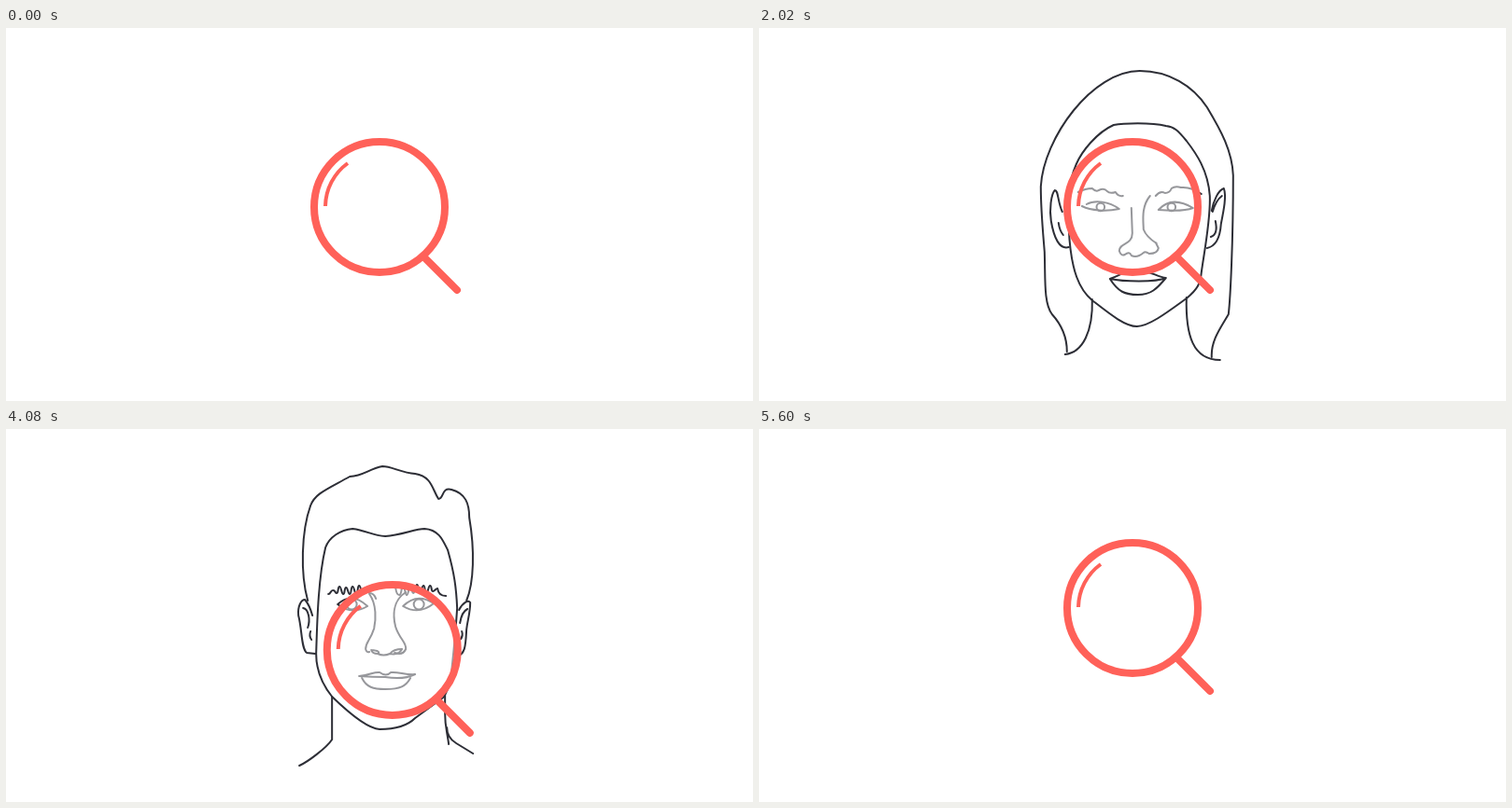
These frames come from a looping animation (800x400 px, 5.76 s). An HTML page:

```html
<!DOCTYPE html>
<html lang="en">
<head>
<meta charset="utf-8">
<title>Magnifier over faces</title>
<style>
html, body { margin: 0; width: 100%; height: 100%; overflow: hidden; background: #fff; }
svg { display: block; width: 800px; height: 400px; }
.face { fill: none; stroke: #2d2e36; stroke-width: 2; stroke-linecap: round; stroke-linejoin: round; }
.glass { fill: none; stroke: #ff6159; stroke-width: 8; }
</style>
</head>
<body>
<svg viewBox="0 0 800 400">
  <g id="woman" class="face">
    <!-- hair and neck -->
    <path d="M331 347C331 330 325 318 315 307C306 295 308 270 307 240C305 215 303 195 303 170C306 118 358 46 409 46C440 46 466 62 481 85C496 110 508 132 509 158C509 230 506 290 504 307C496 321 485 335 486 353"/>
    <path d="M358 291C359 325 348 348 329 350M459 289C458 330 466 356 495 356"/>
    <!-- face -->
    <path d="M381 104C363 112 347 132 341 146C333 165 331 180 333 215C335 262 345 281 358 292C376 306 393 320 406 320C419 320 441 303 459 290C471 280 474 274 475 262C478 240 485 205 484 180C482 152 469 134 459 121C450 110 446 106 437 105C421 101 391 102 381 104Z"/>
    <!-- ears -->
    <path d="M326 197C321 187 322 174 318 174C314 178 312 195 314 207C317 225 323 238 333 235M322 209Q323 217 327 222"/>
    <path d="M486 196C488 185 493 174 499 172C502 180 499 195 496 210C495 225 491 234 481 236M487 197C489 190 493 183 497 180M490 207C492 216 491 222 485 224"/>
    <!-- brows and eyes -->
    <path d="M343 176Q351 172 358 172Q362 176 365 174Q371 171 374 175Q377 178 383 176Q386 181 391 180"/>
    <path d="M426 180Q431 174 436 177Q441 177 443 172Q447 169 453 171Q464 170 475 178"/>
    <path d="M352 189C361 184 376 186 387 194C373 197 357 196 347 191M429 195C439 184 451 184 466 193C456 197 441 196 429 195"/>
    <circle cx="367" cy="192" r="4.3"/><circle cx="443" cy="192" r="4.3"/>
    <!-- nose and mouth -->
    <path d="M400 193L401 220C401 233 387 230 387 239Q389 245 393 243Q398 239 400 244Q406 247 413 241Q415 239 419 242Q428 242 429 236L426 230M420 180C410 192 413 208 413 216Q416 224 427 231"/>
    <path d="M377 269C389 265 394 260 399 261Q406 267 411 261C419 260 428 267 437 268C426 273 391 272 377 269C386 283 393 286 407 286C421 286 427 280 437 268"/>
  </g>
  <g id="man" class="face">
    <!-- hair -->
    <path d="M325 184C317 155 318 110 328 82C333 69 345 65 370 51C385 50 390 43 405 40C415 40 425 47 440 48C458 51 458 64 465 75C471 75 468 62 479 65C494 69 498 80 498 95C504 130 503 165 495 184"/>
    <!-- face -->
    <path d="M344 127C348 116 360 108 373 107C388 109 394 114 408 115C425 114 440 107 450 107C466 108 470 120 475 130C482 155 484 170 485 192C483 225 480 250 478 269Q475 281 470 288L440 310Q428 322 402 322Q386 321 351 287C339 272 334 255 334 241C335 210 336 160 344 127Z"/>
    <!-- ears -->
    <path d="M333 241L324 240C318 236 319 215 315 200C314 190 318 183 322 183Q327 189 330 200M320 192C326 193 328 205 325 213M328 217Q326 222 329 226"/>
    <path d="M487 194C491 186 497 183 499 186C499 198 496 205 495 215C494 232 494 242 484 244M488 208Q490 196 496 193M488 226Q492 222 490 217"/>
    <!-- neck -->
    <path d="M351 287V333C345 342 325 357 316 361M472 281V305C472 320 474 323 476 338M474 320Q474 331 484 337L502 348"/>
    <!-- brows and eyes -->
    <path d="M347 177c3 0 2-4 5-4s2 3 4 3 1-7 3-7 2 8 4 8 1-7 3-7 2 7 4 7 1-8 3-8 2 8 4 8 1-9 3-9 2 9 4 9 1-7 3-7 2 6 4 6q5 0 7 6"/>
    <path d="M419 170q1 8 4 8c3 0 2-10 4-10s2 10 4 10 2-10 4-10 1 8 3 8 2-9 4-9 1 9 3 9 2-8 4-8 1 8 3 8 2-8 4-8 1 6 3 6 3-3 5-3q1 8 9 8"/>
    <path d="M357 188Q372 174 389 190Q372 200 357 188ZM427 190Q442 175 460 187Q444 200 427 190Z"/>
    <circle cx="372" cy="188" r="5.5"/><circle cx="444" cy="188" r="5.5"/>
    <!-- nose and mouth -->
    <path d="M391 177C399 188 398 205 396 214C392 227 387 228 387 236Q388 240 391 239M430 175C416 184 416 200 419 212C423 225 431 229 430 236Q427 243 418 240"/>
    <path d="M393 237Q404 238 400 241Q394 241 393 237M400 241Q406 244 413 241Q417 236 426 236Q422 243 413 241"/>
    <path d="M380 265C392 264 396 260 402 261Q409 266 414 261C422 260 430 264 440 263C430 268 420 268 408 266Q394 266 380 265M383 267C388 277 395 279 408 279C424 279 430 276 435 267"/>
  </g>
  <g id="glass" class="glass">
    <circle cx="400" cy="192" r="70" fill="#fff" fill-opacity=".5"/>
    <path d="M449 247L483 281" stroke-linecap="round"/>
    <path d="M342 191A58 58 0 0 1 366 145" stroke-width="4"/>
  </g>
</svg>
<script>
const LOOP = 5760;
const [woman, man, glass] = ['woman', 'man', 'glass'].map(id => document.getElementById(id));

// Each sweep is a list of [time, dx, dy], followed by a springy return home.
const sweeps = [
  { home: 2020, keys: [[300, 0, 0], [520, -14, -22], [850, 28, 0], [1090, -56, 52],
    [1160, -48, 60], [1360, 2, 8], [1540, 70, -41]] },
  { home: 5600, keys: [[3640, 0, 0], [3900, 28, 26], [4220, -10, 58], [4340, -56, 62],
    [4540, 7, 56], [4800, 34, 50], [5080, 70, -41]] }
];

// Tangent of one axis: flat at the ends and at turning points.
function slope(keys, i, axis) {
  const a = keys[i - 1], b = keys[i], c = keys[i + 1];
  if (!a || !c || (b[axis] - a[axis]) * (c[axis] - b[axis]) <= 0) return 0;
  return (c[axis] - a[axis]) / (c[0] - a[0]);
}

function along(keys, t, axis) {
  const i = keys.findIndex(k => k[0] > t) - 1;
  const a = keys[i], b = keys[i + 1], span = b[0] - a[0], u = (t - a[0]) / span;
  const s = u * u * (3 - 2 * u);
  return a[axis] + (b[axis] - a[axis]) * s
    + span * u * (1 - u) * ((1 - u) * slope(keys, i, axis) - u * slope(keys, i + 1, axis));
}

function backOut(u) {
  const q = u - 1, s = 1.55;
  return 1 + (s + 1) * q ** 3 + s * q * q;
}

function glassAt(t) {
  for (const { home, keys } of sweeps) {
    const last = keys[keys.length - 1];
    if (t < keys[0][0] || t >= home) continue;
    if (t < last[0]) return [along(keys, t, 1), along(keys, t, 2)];
    const left = 1 - backOut((t - last[0]) / (home - last[0]));
    return [last[1] * left, last[2] * left];
  }
  return [0, 0];
}

// Rush in from the right, wobble, then dash left and vanish.
function faceAt(t, rest, start, arrive, swing, gone) {
  if (t < start || t >= gone) return null;
  if (t < arrive) return rest + 750 * ((arrive - t) / (arrive - start)) ** 3;
  const dt = t - arrive;
  const wobble = dt < 1100 ? -swing * Math.sin(Math.PI * dt / 250) * Math.exp(-0.0041 * dt) : 0;
  return rest + wobble - 130 * (Math.max(0, t - gone + 100) / 80) ** 3;
}

function place(el, x, y = 0) {
  el.style.display = x === null ? 'none' : '';
  if (x !== null) el.setAttribute('transform', `translate(${x.toFixed(2)} ${y.toFixed(2)})`);
}

function draw(t) {
  place(woman, faceAt(t, -1.2, 180, 330, 52, 2400));
  place(man, faceAt(t, -2.4, 3060, 3124, 55, 5280));
  place(glass, ...glassAt(t));
}

const begin = performance.now();
function tick() {
  draw((performance.now() - begin) % LOOP);
  requestAnimationFrame(tick);
}
tick();
</script>
</body>
</html>
```
